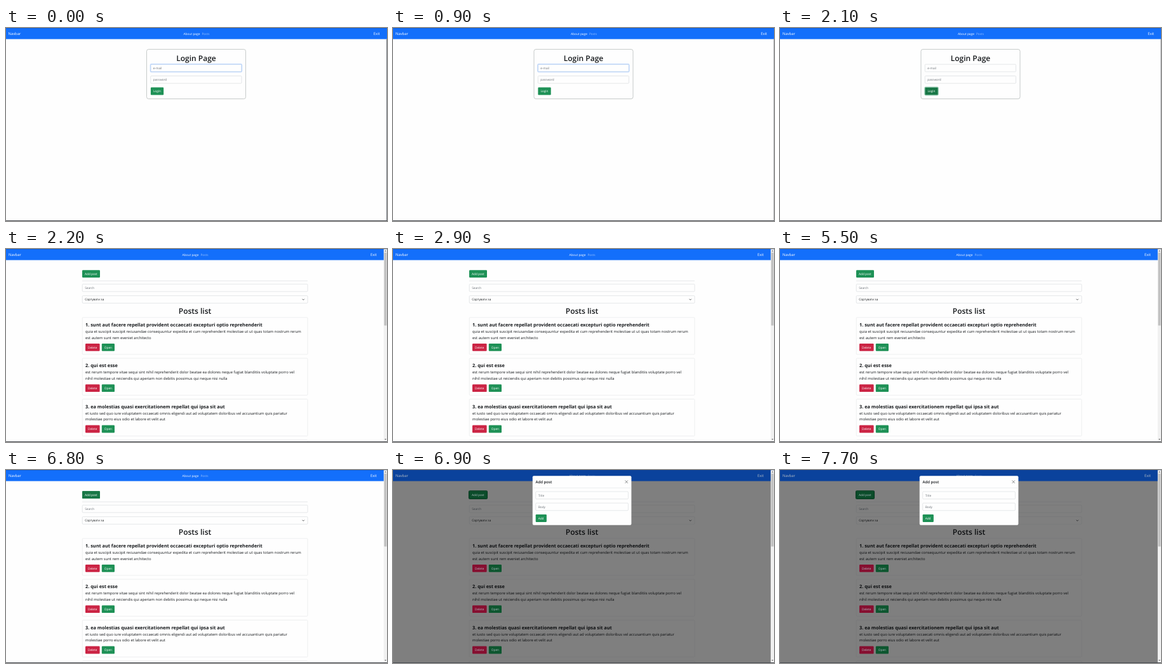
Animation of 600 by 304 pixels, one loop 8 s. Source, as an HTML page:

```html
<!DOCTYPE html>
<html lang="en">
<head>
<meta charset="utf-8">
<title>Posts</title>
<style>
  html, body { margin: 0; width: 100%; height: 100%; overflow: hidden; background: #fff; }
  svg {
    display: block; width: 100vw; height: 100vh;
    font-family: "Open Sans", "Noto Sans", sans-serif;
    text-rendering: geometricPrecision;
    --page: #fefefe; --nav: #136ffb; --ink: #16191c; --hint: #6a7076; --line: #d3d7db;
    --card: #e2e4e6; --field: #fefefe; --green: #1e9156; --red: #cb2444;
    --bright: #fff; --soft: #9dc3fd; --hover: #187746;
  }
  .dim {
    --page: #7f7f7f; --nav: #0a429c; --ink: #0c0e10; --hint: #3c4146; --line: #747678;
    --card: #777879; --field: #7f7f7f; --green: #0d562f; --red: #860f30;
    --bright: #b4bcc4; --soft: #4e74b4; --hover: #0b4c2a;
  }
  .page { fill: var(--page); }
  .nav { fill: var(--nav); }
  .ink { fill: var(--ink); }
  .hint { fill: var(--hint); }
  .bright { fill: var(--bright); }
  .soft { fill: var(--soft); }
  .field { fill: var(--field); stroke: var(--line); stroke-width: .6; }
  .card { fill: var(--page); stroke: var(--card); stroke-width: .6; }
  .panel { fill: #fefefe; stroke: #a9afad; stroke-width: .65; }
  .green { fill: var(--green); }
  .red { fill: var(--red); }
  .hover { fill: var(--hover); }
  .ring { fill: none; stroke: #8cc3a9; stroke-width: 1.1; }
  .dim .ring { stroke: #083a20; }
  .glow { fill: none; stroke: #d3e4fd; stroke-width: 1.2; }
  .focus { fill: none; stroke: #8fb9f5; stroke-width: .5; }
  .stroke { fill: none; stroke: var(--ink); stroke-width: .7; }
  .hidden { display: none; }
</style>
</head>
<body>
<svg id="stage" viewBox="0 0 600 304" preserveAspectRatio="none"></svg>
<script>
const LOOP = 8000, PRESS = 2000, POSTS = 2200, HOVER = 6800, MODAL = 6900;
const SMALL = 4.75, TEXT = 5.87, TITLE = 7.33, HEADING = 12;

const rect = (x, y, w, h, cls, r = 0) =>
  `<rect x="${x}" y="${y}" width="${w}" height="${h}" rx="${r}" class="${cls}"/>`;
const text = (x, y, str, size = SMALL, cls = 'ink', weight = 400, anchor = 'start') =>
  `<text x="${x}" y="${y}" font-size="${size}" class="${cls}" font-weight="${weight}" text-anchor="${anchor}">${str}</text>`;
const group = (id, body) => `<g id="${id}">${body}</g>`;
const heading = (x, y, str) => text(x, y, str, HEADING, 'ink', 600, 'middle');
const button = (x, y, w, str, cls = 'green') =>
  rect(x, y, w, 11.8, cls, 1.2) + text(x + 4, y + 7.7, str, SMALL, 'bright');
const field = (x, y, w, str, cls = 'hint') =>
  rect(x, y, w, 11.7, 'field', 1.2) + text(x + 4, y + 7.7, str, SMALL, cls);
const ring = (x, y, w) => rect(x - .5, y - .5, w + 1, 12.8, 'ring', 1.6);

const navbar = (mid, exit) =>
  rect(-1, 0, 602, 17.5, 'nav') +
  text(4, 11.1, 'Navbar', TEXT, 'bright') +
  text(mid, 10.7, 'About page', 4.85, 'bright') +
  text(mid + 29, 10.7, 'Posts', SMALL, 'soft') +
  text(exit, 11.1, 'Exit', TEXT, 'bright');

const posts = [
  ['sunt aut facere repellat provident occaecati excepturi optio reprehenderit',
   'quia et suscipit suscipit recusandae consequuntur expedita et cum reprehenderit molestiae ut ut quas totam nostrum rerum',
   'est autem sunt rem eveniet architecto'],
  ['qui est esse',
   'est rerum tempore vitae sequi sint nihil reprehenderit dolor beatae ea dolores neque fugiat blanditiis voluptate porro vel',
   'nihil molestiae ut reiciendis qui aperiam non debitis possimus qui neque nisi nulla'],
  ['ea molestias quasi exercitationem repellat qui ipsa sit aut',
   'et iusto sed quo iure voluptatem occaecati omnis eligendi aut ad voluptatem doloribus vel accusantium quis pariatur',
   'molestiae porro eius odio et labore et velit aut']
];

const postCard = ([title, first, second], i) =>
  `<g transform="translate(0 ${i * 64.3})">` +
  rect(120.2, 107.8, 354.8, 58.2, 'card', 1.3) +
  text(125, 122.2, `${i + 1}. ${title}`, TITLE, 'ink', 700) +
  text(125, 132.1, first, TEXT) +
  text(125, 141.6, second, TEXT) +
  button(125, 149, 22.6, 'Delete', 'red') +
  button(150.8, 149, 20.2, 'Open') + '</g>';

const login =
  navbar(280, 579.3) +
  rect(222, 33.6, 156, 78, 'panel', 3) +
  heading(300, 52, 'Login Page') +
  field(228.3, 57.2, 143.2, 'e-mail') +
  group('emailFocus', rect(227.7, 56.6, 144.4, 12.9, 'glow', 1.7) + rect(228.3, 57.2, 143.2, 11.7, 'focus', 1.2)) +
  field(228.3, 75.5, 143.2, 'password') +
  button(228.4, 93.6, 20.3, 'Login') +
  group('loginPress', button(228.4, 93.6, 20.3, 'Login', 'hover') + ring(228.4, 93.6, 20.3)) +
  '<path d="M600 17.5V304" stroke="#6b7178" stroke-width=".9"/>';

const scrollbar =
  '<rect x="594.8" width="5.2" height="304" fill="#f1f1f1"/>' +
  '<rect x="595.5" y="5.5" width="4" height="115" fill="#c1c1c1"/>' +
  '<path d="M596.2 3.8l1.4-1.8 1.4 1.8zM596.2 299l1.4 1.8 1.4-1.8z" fill="#626262"/>';

const list =
  rect(0, 0, 600, 304, 'page') +
  navbar(277.5, 574) +
  button(120, 33.2, 28, 'Add post') +
  group('addHover', button(120, 33.2, 28, 'Add post', 'hover')) +
  group('addFocus', ring(120, 33.2, 28)) +
  '<path d="M120 50.2H475" stroke="var(--line)" stroke-width=".6"/>' +
  field(120.2, 55.3, 354.8, 'Search') +
  field(120.2, 73.6, 354.8, 'Сортувати за', 'ink') +
  '<path d="M466.7 78.7l1.6 1.6 1.6-1.6" class="stroke"/>' +
  heading(297.5, 102.4, 'Posts list') +
  posts.map(postCard).join('') +
  rect(120.2, 300.7, 354.8, 58.2, 'card', 1.3) +
  scrollbar;

const modal =
  rect(219.8, 9.2, 155.6, 77.6, 'page', 2) +
  text(224.6, 21, 'Add post', 6, 'ink', 600) +
  '<path d="M365.5 16.4l4.4 4.4m0-4.4l-4.4 4.4" class="stroke" opacity=".7"/>' +
  '<path d="M219.8 28.2H375.4" stroke="#dee2e6" stroke-width=".6"/>' +
  field(224.7, 34, 145.7, 'Title') +
  field(224.7, 52.1, 145.7, 'Body') +
  button(224.7, 70.1, 17.2, 'Add');

const stage = document.getElementById('stage');
stage.innerHTML =
  rect(0, 0, 600, 304, 'page') +
  group('login', login) + group('list', list) + group('modal', modal) +
  '<rect y="303" width="600" height="1" fill="#4a4d52"/>' +
  '<rect width="600" height=".5" fill="#173a78" opacity=".6"/>';

const el = id => document.getElementById(id);
const parts = [
  ['login', 0, POSTS],
  ['emailFocus', 0, PRESS],
  ['loginPress', PRESS, POSTS],
  ['list', POSTS, LOOP],
  ['addHover', HOVER, LOOP],
  ['addFocus', MODAL, LOOP],
  ['modal', MODAL, LOOP]
].map(([id, from, to]) => ({ node: el(id), from, to }));

const start = performance.now();
function draw() {
  const t = (performance.now() - start) % LOOP;
  for (const { node, from, to } of parts) node.classList.toggle('hidden', t < from || t >= to);
  el('list').classList.toggle('dim', t >= MODAL);
  const settle = Math.min(1, Math.max(0, (t - 100) / 800));
  el('login').setAttribute('transform', `translate(${(settle - 1) * .5} 0)`);
  requestAnimationFrame(draw);
}
draw();
</script>
</body>
</html>
```
